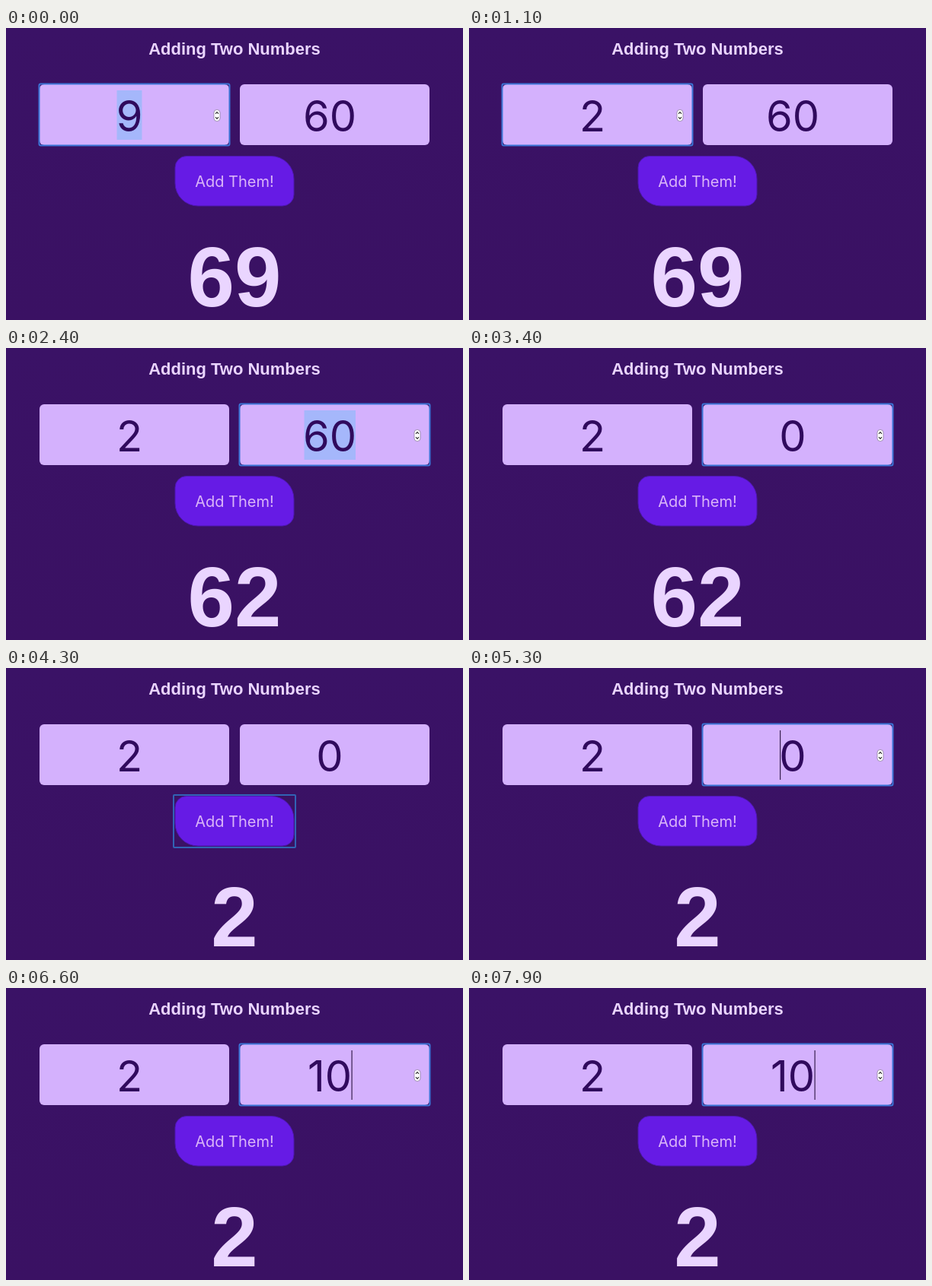
Write an HTML page that moves like this. It is 600 px wide and 384 px high and loops after 8 s.

```html
<!DOCTYPE html>
<html lang="en">
<head>
<meta charset="utf-8">
<title>Adding Two Numbers</title>
<style>
  html, body { margin: 0; width: 100%; height: 100%; overflow: hidden; background: #3a1265; }
  svg { display: block; width: 100vw; height: 100vh; }
  text { text-anchor: middle; }
  .title, .sum { font-family: "Liberation Sans", Arial, sans-serif; font-weight: 700; fill: #ead5ff; }
  .title { font-size: 22px; }
  .sum { font-size: 110.5px; }
  .num { font: 400 56px Inter, sans-serif; fill: #300a5d; }
  .label { font: 400 20px Inter, sans-serif; fill: #dab5f8; }
  .field { fill: #d4b1fd; }
  .ring { fill: none; stroke: #3b75d6; stroke-width: 2; }
  .select { fill: #a5b7fb; }
  .caret { fill: #38214f; }
</style>
</head>
<body>
<svg viewBox="0 0 600 384" preserveAspectRatio="none">
  <defs>
    <linearGradient id="bg" x2="0" y2="1">
      <stop offset="0" stop-color="#3a1266"/>
      <stop offset="1" stop-color="#3a1163"/>
    </linearGradient>
    <g id="spinner">
      <rect x="-4" y="-7.5" width="8" height="15" rx="3.8" fill="#fff" stroke="#8d7f9f" stroke-width=".8"/>
      <path d="M-2 -2.2L0 -4.4L2 -2.2M-2 2.2L0 4.4L2 2.2" fill="none" stroke="#333" stroke-width="1.2"/>
    </g>
  </defs>
  <rect width="600" height="384" fill="url(#bg)"/>
  <text class="title" x="300" y="35">Adding Two Numbers</text>

  <rect class="field" x="44" y="74" width="249" height="80" rx="6"/>
  <rect class="field" x="307" y="74" width="249" height="80" rx="6"/>
  <rect class="select" id="select" y="82" height="65"/>
  <text class="num" id="a" x="162" y="136"></text>
  <text class="num" id="b" x="425" y="136"></text>
  <rect class="caret" id="caret" y="82" width="1.2" height="65"/>

  <path d="M237 168.5H348A30 30 0 0 1 378 198.5V219A15 15 0 0 1 363 234H252A30 30 0 0 1 222 204V183.5A15 15 0 0 1 237 168.5Z"
        fill="#661be5" stroke="#4d17ad" stroke-width="1"/>
  <text class="label" x="300" y="209">Add Them!</text>

  <g id="focusA">
    <rect class="ring" x="43.5" y="73.5" width="250" height="81" rx="2"/>
    <use href="#spinner" x="277" y="115"/>
  </g>
  <g id="focusB">
    <rect class="ring" x="306.5" y="73.5" width="250" height="81" rx="2"/>
    <use href="#spinner" x="540" y="115"/>
  </g>
  <rect id="focusBtn" class="ring" x="220" y="167" width="160" height="69" rx="1" style="stroke:#3163b4"/>

  <text class="sum" id="sum" x="300" y="366"></text>
</svg>
<script>
const LOOP = 8000;
const $ = id => document.getElementById(id);
const show = (id, on) => $(id).setAttribute("visibility", on ? "visible" : "hidden");

// Each step changes part of the form state; `select` is [x, width], `caret` an x.
const steps = [
  { at: 0, a: "9", b: "60", sum: "69", focus: "A", select: [145.5, 33], caret: null },
  { at: 400, a: "2", select: null, caret: 178 },
  { at: 900, caret: null },
  { at: 1400, caret: 178 },
  { at: 1500, sum: "62", focus: "Btn", caret: null },
  { at: 2100, focus: "B", select: [391.5, 67.5] },
  { at: 2700, b: "0", select: null, caret: 441.5 },
  { at: 3200, caret: null },
  { at: 3900, caret: 441.5 },
  { at: 4300, sum: "2", focus: "Btn", caret: null },
  { at: 5200, focus: "B", caret: 408 },
  { at: 5600, b: "10", caret: 453.5 },
  { at: 6100, caret: null },
  { at: 6600, caret: 453.5 },
  { at: 7100, caret: null },
  { at: 7600, caret: 453.5 }
];

function draw(t) {
  const state = Object.assign({}, ...steps.filter(s => s.at <= t));
  for (const id of ["a", "b", "sum"]) $(id).textContent = state[id];
  for (const id of ["A", "B", "Btn"]) show("focus" + id, state.focus === id);
  show("select", state.select);
  if (state.select) {
    $("select").setAttribute("x", state.select[0]);
    $("select").setAttribute("width", state.select[1]);
  }
  show("caret", state.caret);
  if (state.caret) $("caret").setAttribute("x", state.caret);
}

const start = performance.now();
function tick() {
  draw((performance.now() - start) % LOOP);
  requestAnimationFrame(tick);
}
tick();
</script>
</body>
</html>
```
